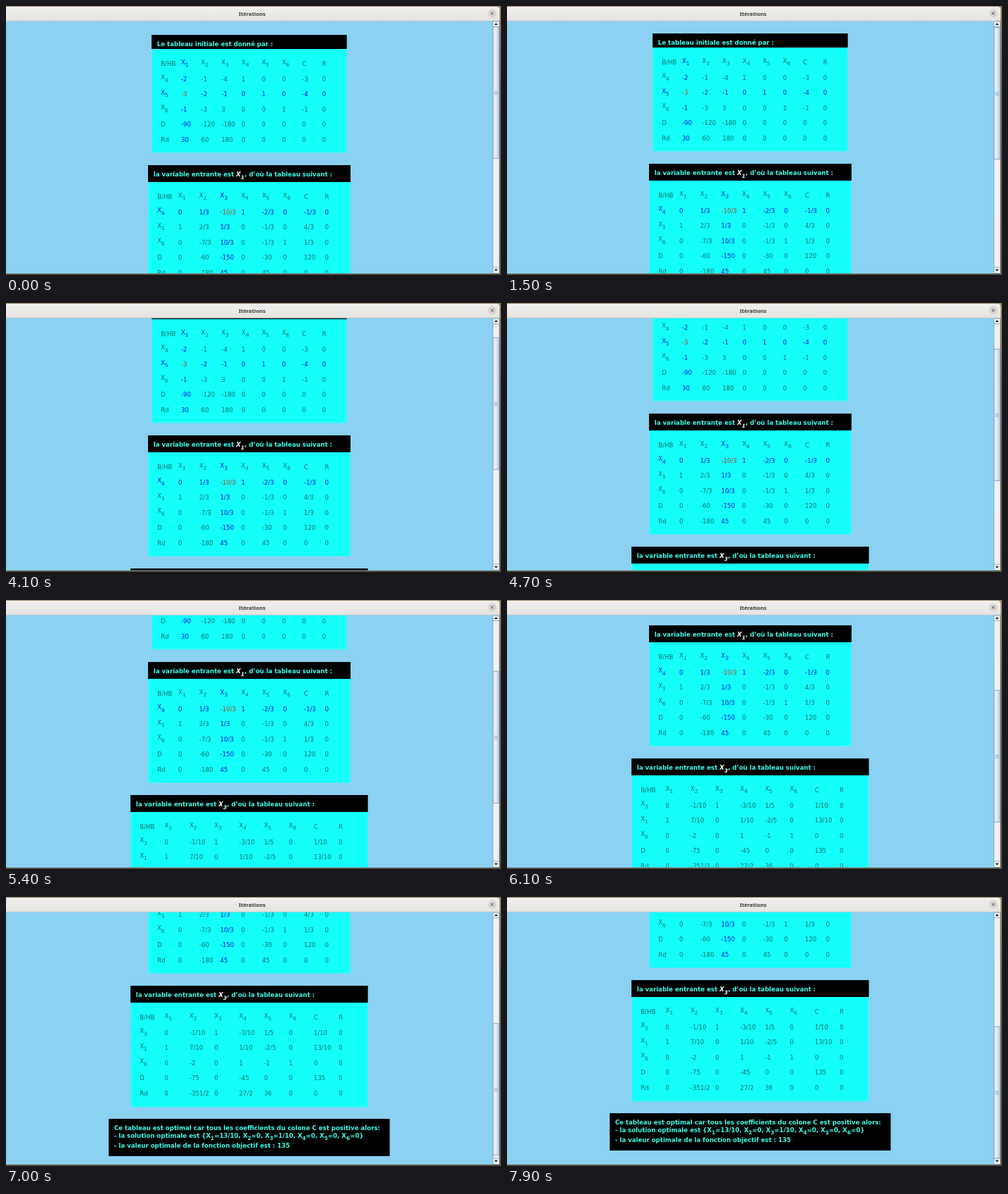
Recreate the animation shown at these times as an HTML page. Size 704 px wide and 382 px high, loop 8000 ms.

```html
<!DOCTYPE html>
<html lang="fr">
<head>
<meta charset="utf-8">
<title>Itérations</title>
<style>
html, body { margin: 0; width: 100%; height: 100%; overflow: hidden; background: #8bd1f2; }
svg { display: block; }
text { font: 8.65px "DejaVu Sans", sans-serif; fill: #0b6f6b; white-space: pre; }
.sub { font-size: 7.4px; }
.blue { fill: #0818d8; }
.red { fill: #a8442c; }
.bold { font-weight: 700; fill: #3ffbe9; }
.var { font-style: oblique; fill: #fff; }
.title { font: 700 7.7px "Noto Sans", "Open Sans", sans-serif; fill: #3a3937; }
</style>
</head>
<body>
<svg width="704" height="382" viewBox="0 0 704 382">
  <defs>
    <linearGradient id="bar" x2="0" y2="1">
      <stop stop-color="#f1efed"/><stop offset="1" stop-color="#e6e4e1"/>
    </linearGradient>
    <linearGradient id="steel">
      <stop stop-color="#d9e7f5"/><stop offset=".4" stop-color="#e6f0fa"/><stop offset="1" stop-color="#b3cbe4"/>
    </linearGradient>
    <linearGradient id="desk" x2="0" y2="1">
      <stop stop-color="#96825c"/><stop offset=".3" stop-color="#6d6251"/><stop offset="1" stop-color="#57523f"/>
    </linearGradient>
    <clipPath id="view"><path d="M0 21.5H692V379.5H0z"/></clipPath>
  </defs>
  <rect width="704" height="382" fill="url(#desk)"/>
  <path d="M0 21H702V380H0z" fill="#8bd1f2"/>
  <g clip-path="url(#view)"><g id="page"></g></g>

  <path d="M0 21V1H698Q702 1 702 5V21z" fill="url(#bar)"/>
  <path d="M0 21.2H702" stroke="#c9c9c7" stroke-width=".7"/>
  <text class="title" x="350" y="13.8" text-anchor="middle">Itérations</text>
  <circle cx="691.5" cy="10.5" r="6" fill="#d8d5d2"/>
  <path d="M689.7 8.7l3.6 3.6m0-3.6l-3.6 3.6" stroke="#3a3937"/>

  <path d="M692.5 22H701.5V379.5H692.5z" fill="#eef0f2" stroke="#8e9cab" stroke-width=".8"/>
  <path d="M692.5 29.5H701.5M692.5 371H701.5" stroke="#8e9cab" stroke-width=".8"/>
  <path d="M694.5 27l2.5-3 2.5 3zM694.5 373.8l2.5 3 2.5-3z" fill="#222"/>
  <g id="thumb">
    <rect x="692.7" y="29.5" width="8.6" height="187" fill="url(#steel)" stroke="#7593bd" stroke-width=".8"/>
    <path d="M694.5 121.5h5m-5 2h5m-5 2h5" stroke="#7d9dc8" stroke-width=".8"/>
  </g>
</svg>
<script>
const page = document.getElementById('page'), thumb = document.getElementById('thumb');

const box = (x, y, w, h, fill) => `<rect x="${x}" y="${y}" width="${w}" height="${h}" fill="${fill}"/>`;

// "X1" becomes an X with a lowered index
const indexed = (s, cls = '') => s.replace(/X(\d)([^X]*)/g, (_, n, rest) =>
  `<tspan class="${cls}">X</tspan><tspan class="sub ${cls}" dy="3.4">${n}</tspan>` +
  (rest ? `<tspan dy="-3.4">${rest}</tspan>` : ''));

const label = (x, y, s, cls, varCls) => `<text x="${x}" y="${y}" class="${cls}">${indexed(s, varCls)}</text>`;

function table({ x, y, w, head, bottom, title, cellX, step, base, rows, pivot = [-1, -1] }) {
  let out = box(x, y, w, bottom - y, '#14fffa') +
    `<path d="M${x + .4} ${y}V${bottom - .4}H${x + w - .4}V${y}" fill="none" stroke="#6fe9f6" stroke-width=".8"/>` +
    box(x, y, w, head, '#000') + label(x + 7.7, y + head - 7.9 + (head < 22 ? 4 : 0), title, 'bold', 'var');
  rows.forEach((row, r) => row.split(' ').forEach((cell, c) => {
    const hit = (r === pivot[0]) + (c === pivot[1]);
    const lift = cell[0] === 'X' ? 2.3 : 0;
    out += label(cellX + c * step, base + r * 21.5 - lift, cell, ['', 'blue', 'red'][hit]);
  }));
  return out;
}

const names = 'B/HB X1 X2 X3 X4 X5 X6 C R';
const entering = n => `la variable entrante est X${n}, d’où la tableau suivant :`;

page.innerHTML = table({
  x: 207, y: 41, w: 277.7, head: 20, bottom: 208.5, cellX: 220.2, step: 28.7, base: 85, pivot: [2, 1],
  title: 'Le tableau initiale est donné par :',
  rows: [names, 'X4 -2 -1 -4 1 0 0 -3 0', 'X5 -3 -2 -1 0 1 0 -4 0', 'X6 -1 -3 3 0 0 1 -1 0',
    'D -90 -120 -180 0 0 0 0 0', 'Rd 30 60 180 0 0 0 0 0']
}) + table({
  x: 202, y: 226, w: 288, head: 24, bottom: 398, cellX: 215.2, step: 29.8, base: 274, pivot: [1, 3],
  title: entering(1),
  rows: [names, 'X4 0 1/3 -10/3 1 -2/3 0 -1/3 0', 'X1 1 2/3 1/3 0 -1/3 0 4/3 0', 'X6 0 -7/3 10/3 0 -1/3 1 1/3 0',
    'D 0 -60 -150 0 -30 0 120 0', 'Rd 0 -180 45 0 45 0 0 0']
}) + table({
  x: 177, y: 415, w: 337.7, head: 24, bottom: 587.5, cellX: 190.2, step: 35.35, base: 463,
  title: entering(3),
  rows: [names, 'X3 0 -1/10 1 -3/10 1/5 0 1/10 0', 'X1 1 7/10 0 1/10 -2/5 0 13/10 0', 'X6 0 -2 0 1 -1 1 0 0',
    'D 0 -75 0 -45 0 0 135 0', 'Rd 0 -351/2 0 27/2 36 0 0 0']
}) + box(146, 604, 399.7, 53, '#000') +
  label(153.7, 620.2, 'Ce tableau est optimal car tous les coefficients du colone C est positive alors:', 'bold') +
  label(153.7, 630.7, '- la solution optimale est {X1=13/10, X2=0, X3=1/10, X4=0, X5=0, X6=0}', 'bold') +
  label(153.7, 645, '- la valeur optimale de la fonction objectif est : 135', 'bold');

// [time, scroll offset]
const keys = [[0, 0], [900, 0], [1500, 2], [3400, 2], [3500, 7], [4700, 69], [5600, 158], [5700, 158],
  [6100, 190], [6200, 190], [7000, 289], [7300, 294], [7900, 297], [8000, 297]];

function scrollAt(t) {
  const i = keys.findIndex(k => k[0] > t);
  const [t0, a] = keys[i - 1], [t1, b] = keys[i];
  return a + (b - a) * (t - t0) / (t1 - t0);
}

function draw() {
  const t = Math.floor(performance.now() % 8000 / 100) * 100;
  const y = Math.round(scrollAt(t));
  page.setAttribute('transform', `translate(0 ${-y})`);
  thumb.setAttribute('transform', `translate(0 ${y * .52})`);
  requestAnimationFrame(draw);
}
draw();
</script>
</body>
</html>
```
